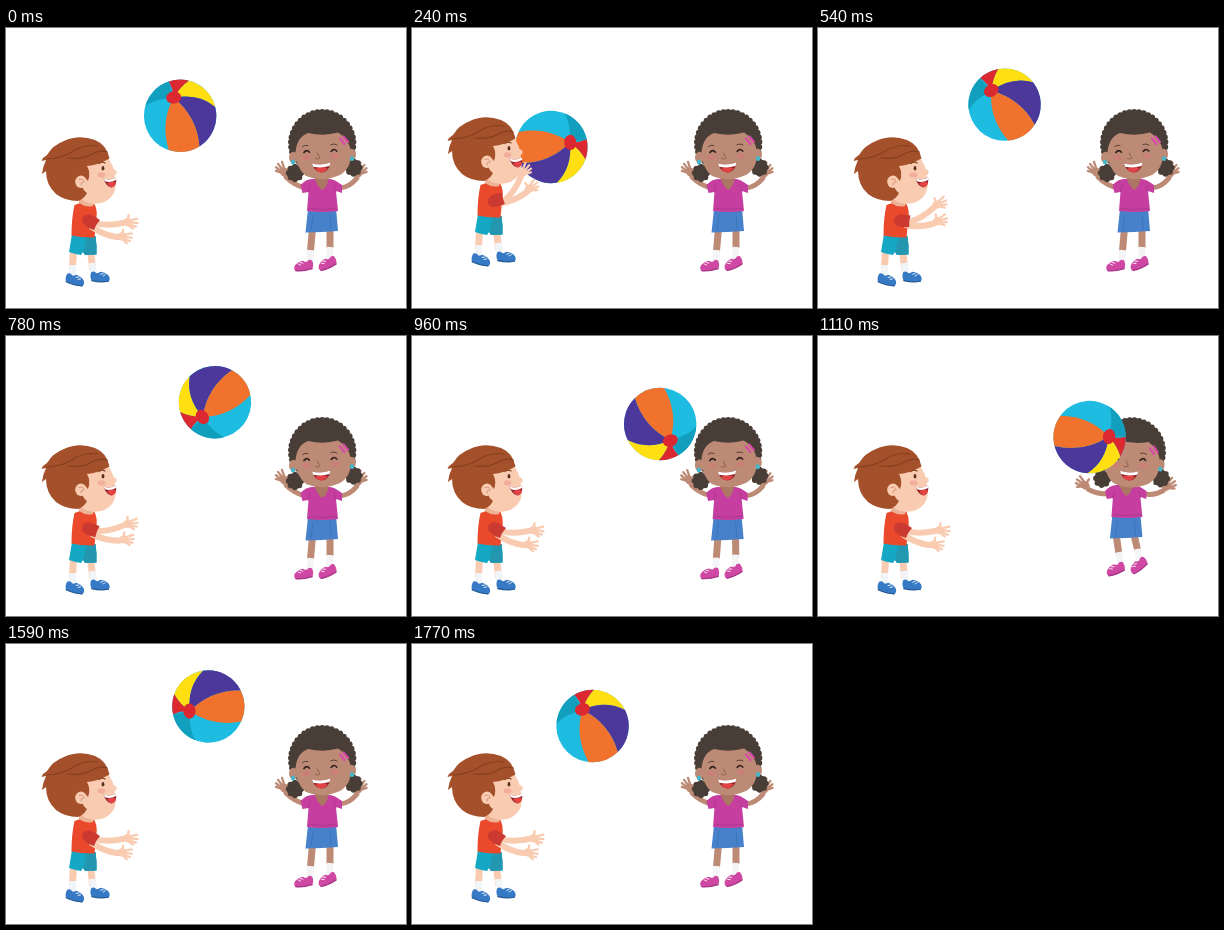
These frames come from a looping animation (400x280 px, 1.8 s). An HTML page:

```html
<!DOCTYPE html>
<html lang="en">
<head>
<meta charset="utf-8">
<title>Playing catch</title>
<style>
html, body { margin: 0; width: 100%; height: 100%; overflow: hidden; background: #fff; }
svg { display: block; width: 400px; height: 280px; }
</style>
</head>
<body>
<svg id="stage" viewBox="0 0 400 280" stroke-linecap="round" stroke-linejoin="round"></svg>
<script>
const NS = 'http://www.w3.org/2000/svg';
const stage = document.getElementById('stage');

function add(parent, tag, attrs = {}) {
  const el = document.createElementNS(NS, tag);
  for (const key in attrs) el.setAttribute(key, attrs[key]);
  parent.append(el);
  return el;
}
const group = parent => add(parent, 'g');
const fill = (parent, d, color) => add(parent, 'path', { d, fill: color });
const line = (parent, d, color, width, cap = 'round') =>
  add(parent, 'path', { d, fill: 'none', stroke: color, 'stroke-width': width, 'stroke-linecap': cap });
const oval = (parent, cx, cy, rx, ry, color, turn = 0) =>
  add(parent, 'ellipse', { cx, cy, rx, ry, fill: color, transform: `rotate(${turn} ${cx} ${cy})` });

// A palm with four fingers and a thumb, fingers along the local x axis.
function hand(parent, x, y, turn, skin, flip = 1) {
  const g = add(parent, 'g', { transform: `translate(${x} ${y}) rotate(${turn}) scale(1 ${flip})` });
  oval(g, 0, 0, 5, 4, skin);
  line(g, 'M2 -2L9.5 -4.2M3 0L10 .2M2 2L8.6 3.8M1 2.5L5.6 6', skin, 2.3);
  line(g, 'M-1 -2Q1 -4 .6 -7', skin, 2.4);
}

function shoe(parent, x, y, turn, color, dark, flip = 1) {
  const g = add(parent, 'g', { transform: `translate(${x} ${y}) rotate(${turn}) scale(${flip} 1)` });
  fill(g, 'M-9 -4Q-6 -6 -4 -3.5Q-2 -3 0 -5Q6 -4.5 9 -1Q11 3 8 4.6Q0 5.8 -8 4.4Q-10.5 1 -9 -4Z', color);
  line(g, 'M-8 4.2Q1 5.8 8.6 4', dark, 1.2);
  line(g, 'M.5 -2.5L3 -3.6M3 -1L5.2 -2.4', '#fff', .8);
}

function drawGirl() {
  const skin = '#bd8a75', hair = '#493e37', pink = '#c63fa0';
  const root = group(stage);
  const legs = [[306.5, 304.5, 232], [324, 324, 229]].map(([hip, foot, y], i) => {
    const g = group(root);
    line(g, `M${hip} 200L${foot} ${y - 9}`, skin, 7, 'butt');
    line(g, `M${foot} ${y - 10}L${foot - .6} ${y + 3}`, '#f4f4f7', 6.6, 'butt');
    shoe(g, i ? 321.2 : 297.7, i ? 235.3 : 237.6, i ? -24 : -8, '#cf48a3', '#a33686', -1);
    return g;
  });

  const body = group(root);
  const left = group(body), right = group(body);
  line(left, 'M299 160Q288 157 280 149', skin, 5);
  hand(left, 278, 144, 235, skin, -1);
  line(right, 'M334 160Q344 159 351 150', skin, 5);
  hand(right, 352.5, 145, -55, skin);
  fill(body, 'M302 181L330 180L332 203Q316 204 299.5 204.5Z', '#4681ca');
  line(body, 'M307 187L305 202M324 186L325 201', '#3971b7', .8);
  fill(body, 'M306 151Q300 151 294.5 157L296.5 165L302.5 164L301 183Q317 185 332 183L330 163L336 165L336 157Q328 151 324 151Z', pink);
  line(body, 'M302.5 164L304 157M330 163L328 157M303 180.5Q316 182.5 330.5 180.5', '#a93489', .8);
  fill(body, 'M308 149L323 149Q321 160 316 162Q311 158 308 149Z', '#ac7762');

  const head = group(root);
  for (const [x, y] of [[289, 145], [347.5, 139.5]]) {
    oval(head, x, y, 8, 8, hair);
    for (let i = 0; i < 8; i++) {
      const a = i * Math.PI / 4;
      oval(head, x + 6.5 * Math.cos(a), y + 6.5 * Math.sin(a), 2.7, 2.7, hair);
    }
  }
  oval(head, 316, 116, 32, 32, hair);
  for (let i = 0; i <= 24; i++) {
    const a = (165 + i * 8.75) * Math.PI / 180;
    oval(head, 316.2 + 31.2 * Math.cos(a), 115.5 + 31.6 * Math.sin(a), 3, 3, hair);
  }
  oval(head, 287.5, 129.5, 4.5, 5.8, skin);
  oval(head, 345.5, 126.5, 4.5, 5.8, skin);
  fill(head, 'M289.5 124Q291 109 302 105Q318 108.5 332 104.5Q343 111 345 123Q346 140 334 147Q316 155 300 148Q290 140 289.5 124Z', skin);
  oval(head, 287, 134, 2.2, 2.5, '#46b6c8');
  oval(head, 346, 130.5, 2.2, 2.5, '#46b6c8');
  oval(head, 300, 129.7, 3.8, 2.4, '#cb7f77');
  oval(head, 329, 128.2, 3.8, 2.4, '#cb7f77');
  line(head, 'M298 124.6Q300.7 121 303.4 124.2M325.2 123.4Q328 119.8 330.7 123', '#33231f', 1.7);
  line(head, 'M296.5 118.5Q299 116.5 302 117.5M325 116.5Q328 115 331 117', '#5d4337', 1);
  line(head, 'M311.5 125Q313 129 314 130Q312 132 309.5 130.5', '#95624f', 1);
  fill(head, 'M306 135.5Q315 138 324.5 134.5Q323 144 315.5 144.5Q308 143.5 306 135.5Z', '#8d2026');
  fill(head, 'M309 141Q316 137 321.5 140.5Q319 144.2 315.5 144.5Q311 144 309 141Z', '#e04245');
  fill(head, 'M306 135.5Q315 138 324.5 134.5L323.5 138Q315 140.5 307.2 138.7Z', '#fff');
  line(head, 'M334 110.5L338.5 116M337.5 108.5L342 114', '#d94aaa', 2.2);
  return { body, head, left, right, legs };
}

function drawBall() {
  const ball = group(stage);
  oval(ball, 0, 0, 36.2, 36.2, '#1fbce1');
  const hub = 'M-6.5 -18';
  const rim = end => `A36.2 36.2 0 0 1 ${end}`;
  fill(ball, `${hub}Q-25 -17 -34.9 -9.6${rim('-11.4 -34.3')}Z`, '#129fbd');
  fill(ball, `${hub}Q-7 -27 -11.4 -34.3${rim('8.9 -35.1')}Q0 -29 -6.5 -18Z`, '#dc2931');
  fill(ball, `${hub}Q0 -29 8.9 -35.1${rim('35.1 -8.9')}Q18 -23 -6.5 -18Z`, '#ffdf12');
  fill(ball, `${hub}Q18 -23 35.1 -8.9${rim('19.3 30.6')}Q17 1 -6.5 -18Z`, '#4c389b');
  fill(ball, `${hub}Q17 1 19.3 30.6${rim('-11.4 34.3')}Q-20 6 -6.5 -18Z`, '#f0722d');
  oval(ball, -6.5, -18.3, 7.6, 6.1, '#dc2931', -8);
  return ball;
}

function drawBoy() {
  const skin = '#f9ccb2', hair = '#a4502a', dark = '#853f1e', sleeve = '#cb3a31';
  const root = group(stage);
  const far = group(root);
  line(far, 'M89 195Q100 198.5 117 195', skin, 6);
  hand(far, 121.5, 194.2, 4, skin);

  line(root, 'M67.5 222L66.5 240M84.5 222L86.5 240', skin, 7);
  line(root, 'M66.7 237L66.5 249M86.2 235L87.8 246', '#f2f5f8', 6.8, 'butt');
  shoe(root, 69, 251.7, 15, '#3679c5', '#285794');
  shoe(root, 94, 248.8, 3, '#3679c5', '#285794');
  fill(root, 'M66 206L89.5 208Q91 218 90.5 226.5L79 227L77 224L75 227Q68 226 63 224Z', '#15a8c4');
  fill(root, 'M81 208L89.5 208Q91 218 90.5 226.5L79 227L77 224Z', '#2396b0');
  fill(root, 'M68.5 177Q79 172 88.5 176Q91.5 182 90.5 190L88.5 209.5Q76 210 65.5 207.5Q65.5 190 68.5 177Z', '#ea4a2b');

  fill(root, 'M73 168L90 170L87 178Q80 180 73 175Z', '#edb296');
  fill(root, 'M82 122Q99 123 104 133Q107 138 107.5 141Q111.5 142 110.5 145.5Q109 147 108.5 147Q112 160 106 168Q99 177 85 175.5Q70 173 69 155Z', skin);
  fill(root, 'M103.5 130.5Q101 117 89 112Q73 106 58 113Q47 117 41 127Q37 129 35.5 133L40 132Q37 138 36 146L40 143Q40 157 50 166Q59 173 72 173Q78 171 81 165Q75 161 76 152Q79 149 82 153Q85 145 81 138Q92 137 103.5 130.5Z', hair);
  line(root, 'M41 131Q58 130 69 122Q80 116 92 118M62 130Q77 132 88 125Q95 122 101 124', dark, 1.2);
  oval(root, 75, 153.8, 5.8, 6.2, skin);
  line(root, 'M73 151.5Q77 150 78 154Q75 154 75 157', '#dc9d83', 1.1);
  oval(root, 95.5, 146.8, 4, 2.6, '#f4ad9b');
  oval(root, 97, 140.2, 1.4, 2.3, '#5a3020');
  line(root, 'M93 135.5Q96 133 99 135', dark, 1.2);
  fill(root, 'M97.5 150.5Q104 153 110 149.5Q111.5 158 105.5 159.5Q100 158.5 97.5 150.5Z', '#8c1f27');
  fill(root, 'M101 155.5Q106 152 110 154.5Q109 159 105.5 159.5Q103 158.5 101 155.5Z', '#e44343');
  fill(root, 'M97.5 150.5Q104 153 110 149.5L110.2 152Q104 155 99 153.3Z', '#fff');

  const near = group(root);
  line(near, 'M86 199Q97 207 111 209', skin, 6.2);
  hand(near, 115.8, 208.6, 6, skin);
  fill(near, 'M76.5 189Q81 184.5 87 187.5L94 192Q90 196 88 202Q79 199 76 194Z', sleeve);
  return { root, far, near };
}

const girl = drawGirl(), ball = drawBall(), boy = drawBoy();

const LOOP = 1800, STEP = 30, LEFT = 240, RIGHT = 1140;
const spots = [[139.4, 119], [202.3, 62.5], [272.4, 101.5]];
const mix = (a, b, k) => a + (b - a) * k;
const ease = k => (1 - Math.cos(Math.PI * k)) / 2;
const clamp = k => Math.max(0, Math.min(1, k));
const set = (el, value) => el.setAttribute('transform', value);
const bump = (t, peak, reach) => ease(clamp(1 - Math.abs(t - peak) / reach));

function pose(t) {
  // Flight runs 0 at the boy, 1 at the apex, 2 at the girl, then back.
  const since = (t - LEFT + LOOP) % LOOP;
  const flight = (since <= 900 ? since : LOOP - since) / 450;
  const leg = flight < 1 ? 0 : 1;
  const k = ease(flight - leg);
  const x = mix(spots[leg][0], spots[leg + 1][0], k);
  const y = mix(spots[leg][1], spots[leg + 1][1], k);
  set(ball, `translate(${x} ${y}) rotate(${96 - flight * 180})`);

  const hop = bump(t, LEFT, 210);
  set(boy.root, `translate(0 ${-20 * hop})`);
  const lift = t < LEFT ? ease(clamp((t - 30) / 210)) : clamp(1 - (t - LEFT) / 670);
  set(boy.near, `rotate(${-45 * lift} 83 193)`);
  set(boy.far, `rotate(${-55 * lift} 88 190)`);

  const leap = bump(t, RIGHT, 210);
  set(girl.head, `translate(${.5 * leap} ${.5 * leap}) rotate(${5 * leap} 318 81)`);
  set(girl.body, `translate(${-8 * leap} ${-2 * leap})`);
  set(girl.left, `rotate(${-19 * leap} 299 158)`);
  set(girl.right, `rotate(${23 * leap} 335 158)`);
  girl.legs.forEach((g, i) =>
    set(g, `translate(${-9 * leap} ${-6 * leap}) rotate(${-14 * leap} ${i ? 324 : 306.5} 202)`));
}

const start = performance.now();
function frame() {
  const t = (performance.now() - start) % LOOP;
  pose(Math.floor(t / STEP) * STEP);
  requestAnimationFrame(frame);
}
frame();
</script>
</body>
</html>
```
